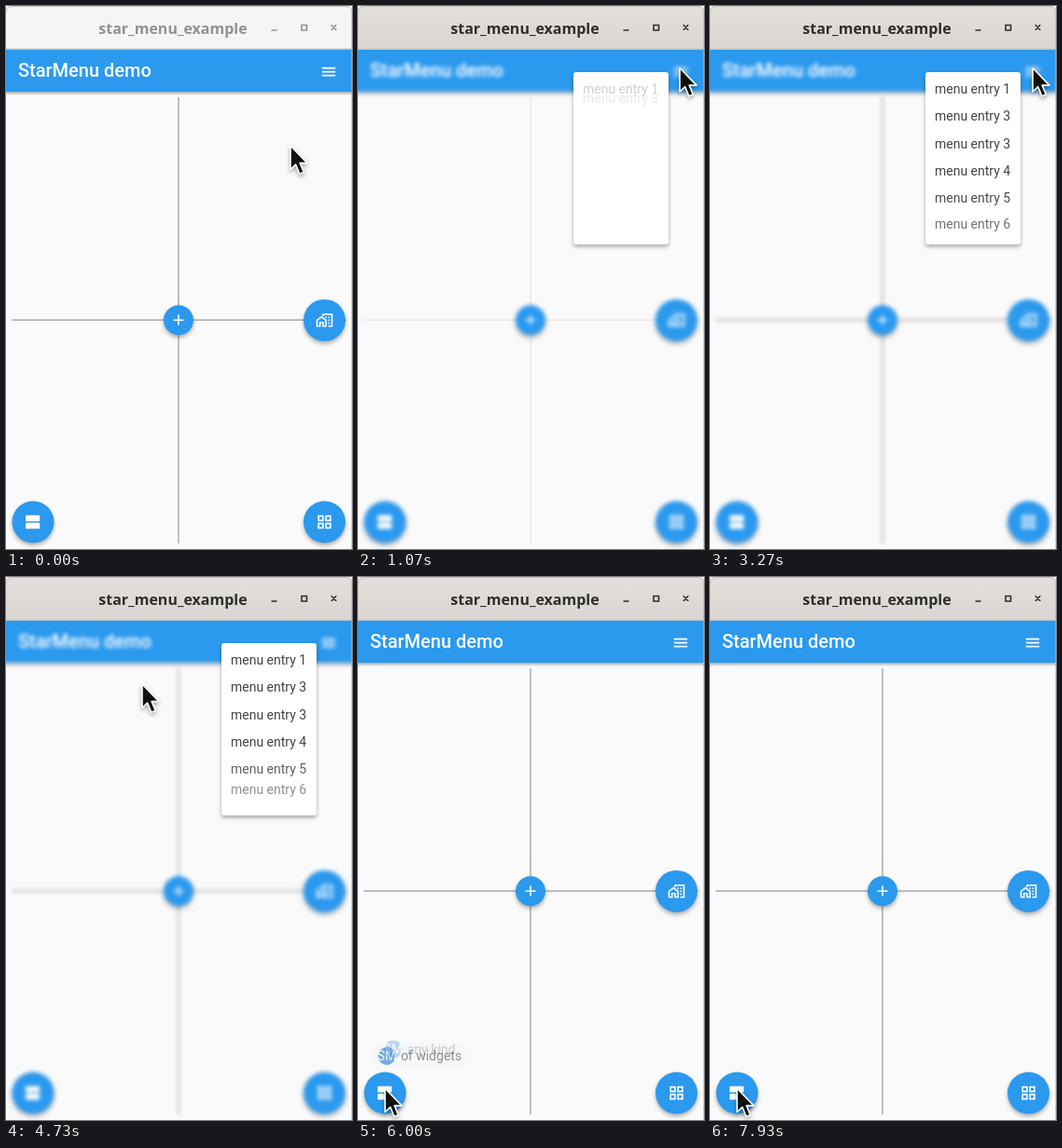
These frames come from a looping animation (371x583 px, 8 s). An HTML page:

```html
<!DOCTYPE html>
<html lang="en">
<head>
<meta charset="utf-8">
<title>StarMenu demo</title>
<style>
  html, body { margin: 0; width: 100%; height: 100%; overflow: hidden; background: #fafafa; }
  svg { display: block; width: 371px; height: 583px; }
  text { font-family: Roboto, sans-serif; font-size: 14px; fill: #424242; }
  .white { fill: #fff; }
  .frame { fill: none; stroke-width: 1.6; }
</style>
</head>
<body>
<svg viewBox="0 0 371 583" xmlns="http://www.w3.org/2000/svg">
  <defs>
    <filter id="blur" filterUnits="userSpaceOnUse" x="-20" y="20" width="411" height="590" color-interpolation-filters="sRGB">
      <feGaussianBlur stdDeviation="2"/>
    </filter>
    <filter id="shadow" x="-30%" y="-30%" width="160%" height="170%" color-interpolation-filters="sRGB">
      <feDropShadow dx="0" dy="2.5" stdDeviation="2" flood-opacity=".32"/>
    </filter>
    <filter id="barShadow" filterUnits="userSpaceOnUse" x="-20" y="20" width="411" height="90" color-interpolation-filters="sRGB">
      <feDropShadow dx="0" dy="2" stdDeviation="1.5" flood-opacity=".32"/>
    </filter>
    <linearGradient id="titleFill" x2="0" y2="1">
      <stop stop-color="#e3dfdc"/><stop offset="1" stop-color="#d9d5d1"/>
    </linearGradient>
  </defs>

  <rect width="371" height="583" fill="#fafafa"/>
  <path id="axes" d="M185 98V577M6 337.2H365" stroke="#999" stroke-width="1.2"/>
  <g id="page">
    <rect x="-20" y="20" width="411" height="72" fill="#2b99ee" filter="url(#barShadow)"/>
    <text x="13" y="76" class="white" style="font-size:20px;font-weight:500">StarMenu demo</text>
    <path class="white" transform="translate(336.4 61) scale(.8)" d="M3 18h18v-2H3zM3 13h18v-2H3zM3 6v2h18V6z"/>
    <g id="buttons" fill="#2b99ee"></g>
  </g>

  <g id="chips"></g>
  <g id="panel">
    <rect x="231" y="71" width="102" height="185" rx="3" fill="#fff" filter="url(#shadow)"/>
    <g id="entries"></g>
  </g>

  <rect width="371" height="46.5" fill="#f6f5f4"/>
  <rect id="titleBar" width="371" height="46.5" fill="url(#titleFill)"/>
  <path d="M0 46H371" stroke="#c9c4bf" stroke-width="1"/>
  <path d="M370.5 0V583" stroke="#b8b8b8" stroke-width="1" opacity=".6"/>
  <path d="M0 7Q0 .5 7 .5H364Q371 .5 371 7" fill="none" stroke="#c4c0bc"/>
  <path d="M0 0H5Q0 0 0 5ZM371 0H366Q371 0 371 5Z" fill="#fff"/>
  <g id="titleInk">
    <text x="179" y="29.5" text-anchor="middle" style="font:bold 16px 'Noto Sans','Open Sans',sans-serif;fill:inherit">star_menu_example</text>
    <path class="frame" d="M284.5 26H290.5M317 20.5H322.500V26H317ZM348.800 20.300L354.200 25.700M354.200 20.300L348.800 25.700"/>
  </g>

  <path id="cursor" d="M0 0V25.500L5.700 20.200L9.800 30.300L14.300 28.400L10.200 18.600H18Z" fill="#111" stroke="#fff" stroke-width="1.6" stroke-linejoin="round" filter="url(#shadow)"/>
</svg>
<script>
const LOOP = 8000;
const $ = id => document.getElementById(id);
const clamp = v => Math.max(0, Math.min(1, v));
const lerp = (a, b, k) => a + (b - a) * k;
const easeOut = k => 1 - (1 - k) ** 3.3;
const easeInOut = k => k * k * (3 - 2 * k);

function add(parent, tag, attrs, text) {
  const el = document.createElementNS('http://www.w3.org/2000/svg', tag);
  for (const key in attrs) el.setAttribute(key, attrs[key]);
  if (text) el.textContent = text;
  return parent.appendChild(el);
}

const icons = {
  plus: 'M19 13h-6v6h-2v-6H5v-2h6V5h2v6h6z',
  bars: 'M20 13H3q-1 0-1 1v6q0 1 1 1h17q1 0 1-1v-6q0-1-1-1zM20 3H3q-1 0-1 1v6q0 1 1 1h17q1 0 1-1V4q0-1-1-1z',
  grid: 'M3 3v8h8V3zm6 6H5V5h4zM3 13v8h8v-8zm6 6H5v-4h4zM13 3v8h8V3zm6 6h-4V5h4zM13 13v8h8v-8zm6 6h-4v-4h4z',
  home: 'M2 20V12L8 7.500L14 12V20H10V15H6V20ZM10 6.500V4H22V20H17',
};

function button(x, y, r, icon) {
  add($('buttons'), 'circle', { cx: x, cy: y, r, filter: 'url(#shadow)' });
  const g = add($('buttons'), 'g', { transform: `translate(${x - 9.6} ${y - 9.6}) scale(.8)` });
  if (icon === 'home') {
    add(g, 'path', { d: icons.home, fill: 'none', stroke: '#fff', 'stroke-width': 2 });
    add(g, 'path', { d: 'M17 7h2v2h-2zm0 4h2v2h-2zm0 4h2v2h-2zM13 7h2v2h-2z', class: 'white' });
  } else {
    add(g, 'path', { d: icons[icon], class: 'white', 'fill-rule': 'evenodd' });
  }
}
button(185, 337.2, 16, 'plus');
button(341.5, 337.4, 22.5, 'home');
button(29, 554, 22.5, 'bars');
button(341.5, 554, 22.5, 'grid');

const entries = [1, 3, 3, 4, 5, 6].map(n =>
  add($('entries'), 'text', { x: 241, y: 94 }, 'menu entry ' + n));

const chips = ['of widgets', 'any kind', 'almost', 'can be', 'entries', 'the menu'].map(label => {
  const g = add($('chips'), 'g', {});
  const back = add(g, 'rect', { y: -13, height: 26, rx: 13, fill: '#e0e0e0' });
  const avatar = add(g, 'circle', { r: 9.6, fill: '#1976d2' });
  const initials = add(g, 'text', { y: 5, class: 'white', 'text-anchor': 'middle' }, 'SM');
  const text = add(g, 'text', { y: 5 }, label);
  const width = text.getComputedTextLength() + 41;
  const left = 68 - width / 2;
  back.setAttribute('x', left);
  back.setAttribute('width', width);
  avatar.setAttribute('cx', left + 16);
  initials.setAttribute('x', left + 16);
  text.setAttribute('x', left + 31);
  return { g, back };
});

// open and close: [start, time per item, delay between items]
const listRuns = [
  { open: [1025, 180, 25], close: [2375, 40, 8], from: 1060, to: 2460, thin: true },
  { open: [2825, 260, 50], close: [4682, 120, 30], from: 2865, to: 4950 },
];
const chipRun = { open: [5884, 200, 66], close: [7650, 110, 27] };

function progress(run, i, t) {
  const [a, da, sa] = run.open, [b, db, sb] = run.close;
  return Math.min(clamp((t - a - i * sa) / da), 1 - clamp((t - b - (5 - i) * sb) / db));
}

// cursor stops: [time, x, y]
const stops = [
  [70, 305, 150], [870, 345, 66.5], [2870, 345, 66.5], [3000, 346, 66.5],
  [4000, 346, 66.5], [4640, 146, 115], [4870, 146, 115], [5700, 29, 549],
];

function cursorAt(t) {
  const n = stops.findIndex(s => s[0] > t);
  if (n < 1) return (n ? stops[stops.length - 1] : stops[0]).slice(1);
  const [t0, x0, y0] = stops[n - 1], [t1, x1, y1] = stops[n];
  const k = easeInOut((t - t0) / (t1 - t0));
  return [lerp(x0, x1, k), lerp(y0, y1, k)];
}

function draw(t) {
  const focus = clamp((t - 70) / 200);
  $('titleBar').setAttribute('opacity', focus);
  const ink = `rgb(${[0, 1, 2].map(() => Math.round(lerp(145, 46, focus)))})`;
  $('titleInk').setAttribute('fill', ink);
  $('titleInk').setAttribute('stroke', 'none');
  $('titleInk').lastElementChild.setAttribute('stroke', ink);

  const run = listRuns.find(r => t >= r.from && t < r.to);
  $('panel').setAttribute('visibility', run ? 'visible' : 'hidden');
  $('page').setAttribute('filter', run ? 'url(#blur)' : 'none');
  $('axes').setAttribute('filter', run && !run.thin ? 'url(#blur)' : 'none');
  $('axes').setAttribute('opacity', run && run.thin ? .22 : 1);
  if (run) entries.forEach((el, i) => {
    const k = progress(run, i, t);
    el.setAttribute('opacity', k);
    el.setAttribute('y', 94 + 29.3 * i * easeOut(k));
  });

  chips.forEach(({ g, back }, i) => {
    const k = progress(chipRun, i, t);
    g.setAttribute('opacity', k);
    g.setAttribute('transform', `translate(0 ${lerp(554, 512 - 33.8 * i, easeOut(k))})`);
    back.setAttribute('opacity', clamp(2 * k - 1));
  });

  $('cursor').setAttribute('transform', `translate(${cursorAt(t)})`);
}

function tick() {
  draw(performance.now() % LOOP);
  requestAnimationFrame(tick);
}
tick();
</script>
</body>
</html>
```
